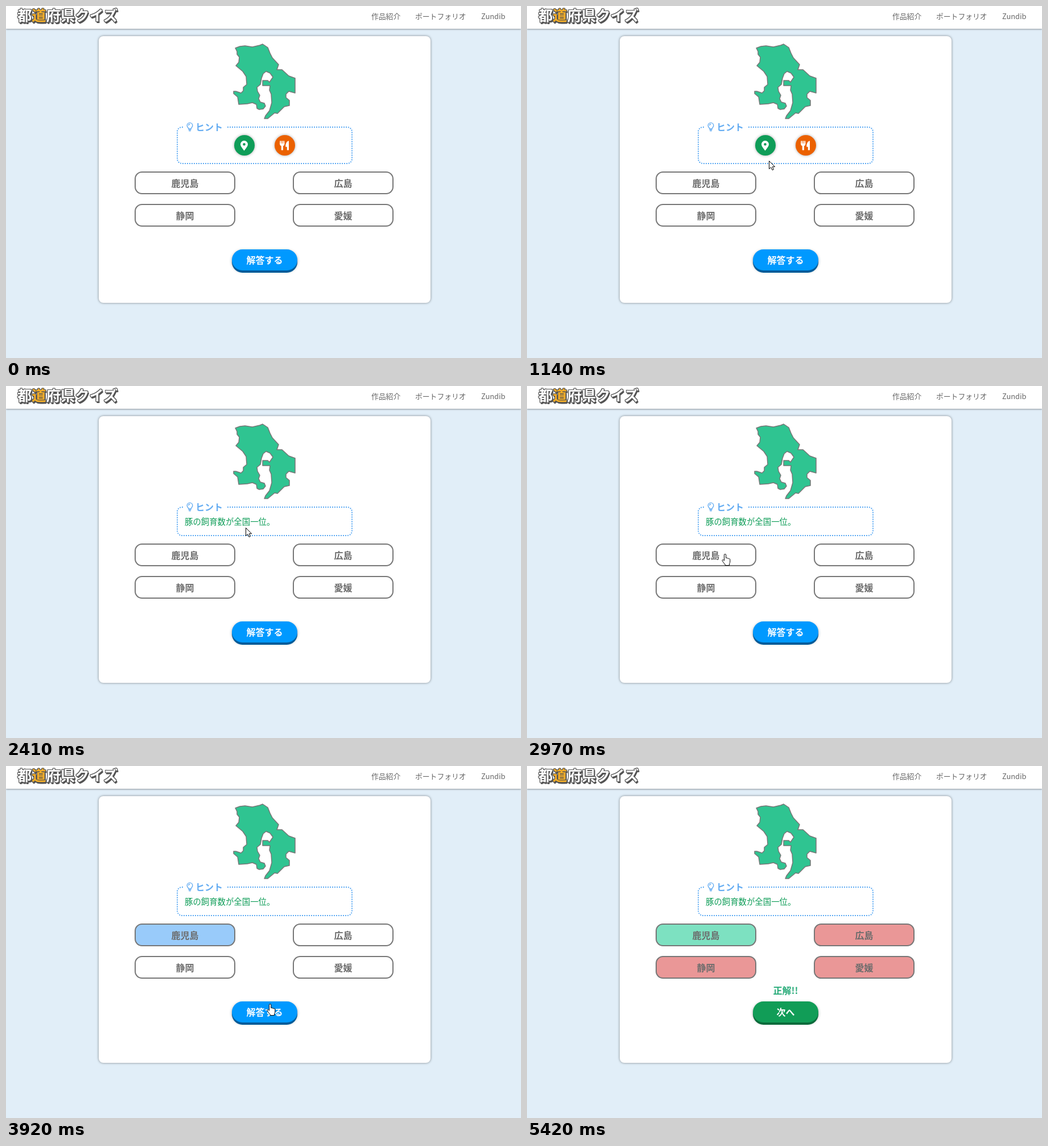
Write an HTML page that moves like this. It is 905 by 619 pixels and loops after 5.95 s.

```html
<!DOCTYPE html>
<html lang="ja">
<head>
<meta charset="utf-8">
<title>クイズ</title>
<style>
  html, body { margin: 0; width: 100%; height: 100%; overflow: hidden; }
  body { background: #e1eef8; font: 16px/20px "Noto Sans CJK JP", "Noto Sans CJK", "Noto Sans JP", sans-serif; }
  #stage { position: relative; width: 905px; height: 619px; overflow: hidden; }
  #stage *, #stage svg { position: absolute; box-sizing: border-box; white-space: nowrap; }
  #stage svg * { position: static; }
  header { left: 0; top: 0; width: 905px; height: 40px; background: #fff; box-shadow: 0 1px 3px rgba(0,0,0,.4); }
  h1 {
    left: 20px; top: -1px; margin: 0; font-size: 25.3px; line-height: 32px; color: #fff;
    text-shadow: 1px 0 #555, -1px 0 #555, 0 1px #555, 0 -1px #555, 1px 1px #555, -1px -1px #555,
      1px -1px #555, -1px 1px #555, 1px 2px #555, 2px 2px #555, 1px 3px #555, 2px 3px #555;
  }
  #stage h1 span { position: static; color: #f5ae27; }
  nav span { top: 8px; font-size: 12.8px; font-weight: 500; color: #666; }
  #card { left: 163px; top: 53px; width: 583px; height: 469px; border-radius: 8px; background: #fff; box-shadow: 0 0 4px rgba(0,0,0,.45); }
  #hint { left: 300px; top: 212px; width: 309px; border: 2px dotted #5aa9f3; border-radius: 9px; }
  #legend { left: 311px; top: 202px; width: 76px; height: 20px; padding-left: 22px; background: #fff; color: #64acf2; font-weight: 700; }
  #note { left: 314px; top: 228px; font-size: 14.4px; color: #0f9d58; }
  .round { top: 227px; width: 36px; height: 36px; border-radius: 50%; box-shadow: 0 0 5px rgba(0,0,0,.35); }
  .choice {
    width: 177px; height: 40px; border: 2px solid #777; border-radius: 13px;
    line-height: 36px; text-align: center; font-weight: 700; color: #6c6c6c;
  }
  #verdict { left: 397px; top: 384px; width: 115px; text-align: center; font-weight: 700; color: #27ab78; }
  #action {
    left: 397px; top: 414px; width: 115px; height: 37px; border-radius: 19px;
    line-height: 37px; text-align: center; font-weight: 700; color: #fff;
  }
  #press { width: 22px; height: 22px; border-radius: 50%; background: rgba(255,255,0,.5); }
  #pointer { left: 0; top: 0; overflow: visible; }
</style>
</head>
<body>
<div id="stage">
  <header>
    <h1>都<span>道</span>府県クイズ</h1>
    <nav>
      <span style="left:642px">作品紹介</span>
      <span style="left:719px">ポートフォリオ</span>
      <span style="left:835px">Zundib</span>
    </nav>
  </header>
  <div id="card"></div>
  <svg width="905" height="210" style="left:0;top:0">
    <path fill="#2fc491" stroke="#777" stroke-width="1.5" stroke-linejoin="round" d="M403 74L411 71 420 70 433 72 446 69 451 67 460 73 464 83
      468 91 479 103 476 112 485 112 497 123 508 127V153L497 150 492 155V161L498 166V175L489 177 477 189 472 188 460 198H454L456 193
      463 184 467 170 466 155 463 148 464 140H451V131H460L463 134 469 125 464 118 457 115 452 119 449 127 447 138 441 143 442 150 446 157
      444 163 447 169 454 171 456 176 452 181 445 182 441 180 440 173 433 170 424 172 409 173 407 160 400 154V150H404L413 153 417 149V143L423 138
      422 124 416 115 404 105 409 99 410 90 406 85V80Z"/>
  </svg>
  <div id="hint"></div>
  <div id="legend">ヒント</div>
  <svg width="14" height="18" style="left:316px;top:204px" fill="none" stroke="#64acf2" stroke-width="1.4">
    <path d="M4.7 12C4.7 9.6 2.2 9.4 2.2 6.2A4.8 4.8 0 0 1 11.8 6.2C11.8 9.4 9.3 9.6 9.3 12ZM4.7 13.7H9.3M5.2 15.6H8.8M4.7 6.3Q4.8 4 7 3.8"/>
  </svg>
  <div id="icons">
    <div class="round" style="left:401px;background:#0f9d58">
      <svg width="36" height="36" style="left:0;top:0"><path fill="#fff" fill-rule="evenodd"
        d="M17.5 27.5C14.5 23.4 11 19.6 11 16.3A6.5 6.5 0 0 1 24 16.3C24 19.6 20.5 23.4 17.5 27.5ZM15.2 16.3A2.3 2.3 0 1 0 19.8 16.3 2.3 2.3 0 1 0 15.2 16.3Z"/></svg>
    </div>
    <div class="round" style="left:472px;background:#eb6100">
      <svg width="36" height="36" style="left:0;top:0"><path fill="#fff"
        d="M9.5 10H11L11.5 15H12.2L12.4 10H14L14.2 15H15L15.4 10H17L17.5 15.5Q17.3 18.5 15 19.3V26.5H11.7V19.3Q9.3 18.5 9 15.5ZM25 10V26.5H21.8V20.8H19.3Q18.8 11.5 25 10Z"/></svg>
    </div>
  </div>
  <div id="note">豚の飼育数が全国一位。</div>
  <div id="lower" style="left:0;top:0">
    <div class="choice" style="left:226px;top:277px">鹿児島</div>
    <div class="choice" style="left:504px;top:277px">広島</div>
    <div class="choice" style="left:226px;top:334px">静岡</div>
    <div class="choice" style="left:504px;top:334px">愛媛</div>
    <div id="verdict">正解!!</div>
    <div id="action"></div>
  </div>
  <div id="press"></div>
  <svg id="pointer" width="18" height="24" stroke="#000" stroke-linejoin="round" fill="#fff">
    <path id="arrow" d="M.5 .5V14.5L3.8 11.6 6 16.5 8.4 15.5 6.3 10.7H10.6Z"/>
    <path id="hand" transform="translate(-6 0)" d="M4.5 12V2.2A1.6 1.6 0 0 1 7.7 2.2V7.6A1.5 1.5 0 0 1 10.2 8.2 1.5 1.5 0 0 1 12.6 9 1.4 1.4 0 0 1 14.8 10.4V14C14.8 16.2 13.5 17 13.5 19V20.5H6.2V19C4.2 17 2.7 14.6 1.3 12.6 .4 11 2 9.9 3.2 11Z"/>
  </svg>
</div>
<script>
  const LOOP = 5950, HINT_AT = 1780, PICK_AT = 3300, SOLVED_AT = 4500;
  const CLICKS = [[1710, 1780], [3230, 3300], [4430, 4500]];
  // time, x, y of the pointer tip
  const KEYS = [
    [430, 770, 608], [700, 514, 399], [1000, 428, 294], [1350, 423, 248], [2350, 423, 248],
    [2970, 348, 295], [3620, 348, 295], [3920, 464, 418], [4100, 472, 445], [4940, 472, 445], [5390, 840, 605]
  ];
  const $ = id => document.getElementById(id);
  const choices = [...document.querySelectorAll('.choice')];
  const show = (el, on) => { el.style.display = on ? '' : 'none'; };
  const clamp = v => Math.max(0, Math.min(1, v));
  const inside = (x, y, l, t, w, h) => x >= l && x < l + w && y >= t && y < t + h;

  const secant = (i, a) => (KEYS[i + 1][a] - KEYS[i][a]) / (KEYS[i + 1][0] - KEYS[i][0]);
  function slope(i, a) {
    if (i === 0) return secant(0, a);
    if (i === KEYS.length - 1) return secant(i - 1, a);
    const p = secant(i - 1, a), n = secant(i, a);
    return p * n > 0 ? 2 * p * n / (p + n) : 0;
  }

  // Monotone cubic interpolation along one axis
  function along(t, a) {
    let i = 0;
    while (i < KEYS.length - 2 && t >= KEYS[i + 1][0]) i++;
    const span = KEYS[i + 1][0] - KEYS[i][0], s = clamp((t - KEYS[i][0]) / span), r = 1 - s;
    return KEYS[i][a] * r * r * (1 + 2 * s) + KEYS[i + 1][a] * s * s * (3 - 2 * s)
      + span * (slope(i, a) * s * r * r - slope(i + 1, a) * s * s * r);
  }

  function drawPointer(t, shift) {
    const offset = t < 3600 ? 10 : 20;
    const q = Math.floor((t - offset) / 30) * 30 + offset;
    const x = Math.round(along(q, 1)), y = Math.round(along(q, 2));
    const over = t < HINT_AT && Math.hypot(x - 419, y - 245) < 18
      || inside(x, y - shift, 397, 414, 115, 41)
      || [226, 504].some(l => [277, 334].some(top => inside(x, y - shift, l, top, 177, 40)));
    $('pointer').style.transform = `translate(${x}px,${y}px)`;
    show($('pointer'), t >= 430 && t < 5420);
    show($('hand'), over);
    show($('arrow'), !over);
    $('press').style.transform = `translate(${x - 11}px,${y - 12}px)`;
    show($('press'), CLICKS.some(([from, to]) => t >= from && t < to));
  }

  function drawAction(t, solved) {
    const sunk = 3 * (clamp((t - 3940) / 130) - clamp((t - 5010) / 130));
    const [face, edge] = solved ? ['#119d57', '#0b6b3b'] : ['#0099ff', '#005b99'];
    const style = $('action').style;
    $('action').textContent = solved ? '次へ' : '解答する';
    style.background = face;
    style.transform = `translateY(${sunk}px)`;
    style.boxShadow = `0 ${4 - sunk}px 0 ${edge}, 0 ${2 - sunk / 2}px 5px rgba(0,0,0,.4)`;
  }

  function render(t) {
    const hinted = t >= HINT_AT, solved = t >= SOLVED_AT, shift = hinted ? 0 : 14;
    $('hint').style.height = 52 + shift + 'px';
    $('lower').style.transform = `translateY(${shift}px)`;
    show($('icons'), !hinted);
    show($('note'), hinted);
    show($('verdict'), solved);
    choices.forEach((el, i) => {
      const picked = i === 0 && t >= PICK_AT;
      el.style.background = solved ? (i ? '#ea9797' : '#7de1c1') : picked ? '#99cbfa' : '#fff';
    });
    drawAction(t, solved);
    drawPointer(t, shift);
  }

  const start = performance.now();
  function tick() {
    render((performance.now() - start) % LOOP);
    requestAnimationFrame(tick);
  }
  tick();
</script>
</body>
</html>
```
